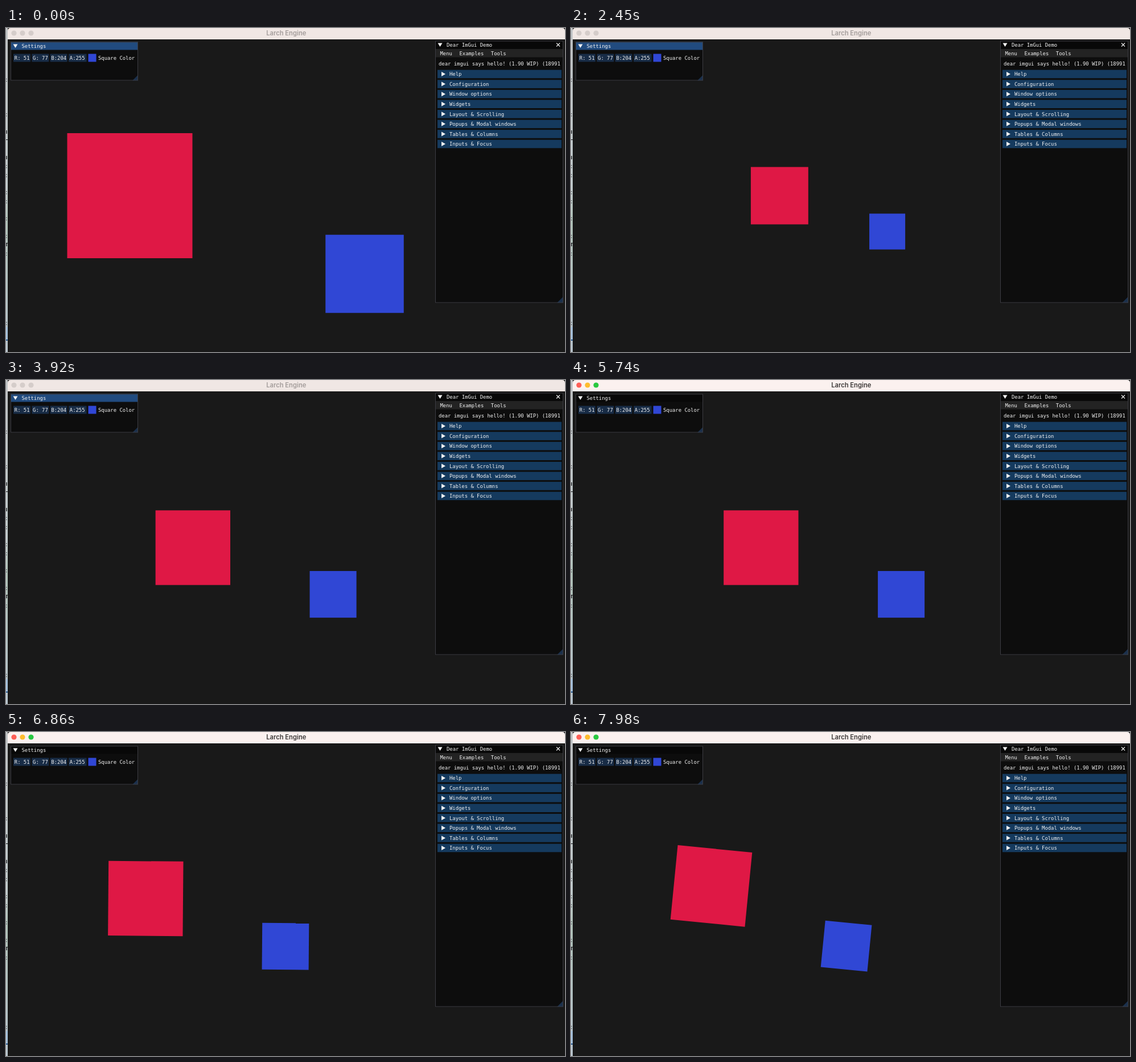
An HTML page that plays this animation: 982 by 570 pixels, repeating every 8 s.

```html
<!DOCTYPE html>
<html lang="en">
<head>
<meta charset="utf-8">
<title>Larch Engine</title>
<style>
  html, body { margin: 0; width: 100%; height: 100%; overflow: hidden; background: #191919; }
  svg { display: block; width: 100vw; height: 100vh; }
  .ui { font: 8.9px "DejaVu Sans Mono", monospace; fill: #f4f4f4; white-space: pre; }
  .title { font: 600 11.2px Inter, sans-serif; text-anchor: middle; }
</style>
</head>
<body>
<svg id="stage" viewBox="0 0 982 570">
  <defs>
    <clipPath id="view"><rect x="3" y="20" width="979" height="550"/></clipPath>
    <linearGradient id="edge" x2="0" y2="1">
      <stop offset="0" stop-color="#c3c6c8"/>
      <stop offset=".5" stop-color="#c6d0d2"/>
      <stop offset=".6" stop-color="#b4c6bd"/>
      <stop offset="1" stop-color="#bcc8d2"/>
    </linearGradient>
  </defs>
  <rect width="982" height="570" fill="#191919"/>
  <g id="behind"><rect width="3" height="570" fill="url(#edge)"/></g>
  <g clip-path="url(#view)">
    <g id="scene">
      <rect x="-1.4" y="-.4" width=".8" height=".8" fill="#df1845"/>
      <rect x=".25" y=".25" width=".5" height=".5" fill="#3047d5"/>
    </g>
  </g>
  <path id="bar" d="M3 20V5Q3 0 8 0H977Q982 0 982 5V20Z"/>
  <g id="lights"></g>
  <text id="title" class="title" x="492.3" y="13">Larch Engine</text>
  <g id="settings"></g>
  <g id="demo"></g>
</svg>
<script>
const NS = "http://www.w3.org/2000/svg";
const $ = id => document.getElementById(id);

function add(parent, tag, attrs, text) {
  const el = document.createElementNS(NS, tag);
  for (const k in attrs) el.setAttribute(k, attrs[k]);
  if (text) el.textContent = text;
  return parent.appendChild(el);
}
const box = (p, x, y, width, height, fill) => add(p, "rect", { x, y, width, height, fill });
const label = (p, x, y, text) => add(p, "text", { x, y, class: "ui" }, text);
const shape = (p, d, fill = "#f4f4f4") => add(p, "path", { d, fill });

function panel(p, x, y, w, h, barColor, grip) {
  box(p, x, y, w, h, "#0d0d0d");
  const bar = box(p, x, y, w, 14, barColor);
  shape(p, `M${x + w} ${y + h}v${-grip}l${-grip} ${grip}z`, "#1b304c");
  add(p, "rect", { x: x + .5, y: y + .5, width: w - 1, height: h - 1, fill: "none", stroke: "#3c3c42" });
  shape(p, `M${x + 4.5} ${y + 4}h8l-4 6.5z`);
  return bar;
}

// Sliver of the window behind
for (const y of [91, 152, 243, 259, 289, 305, 335, 366, 397, 519]) {
  box($("behind"), 0, y - 2, 1.4, 1.4, "#55595c");
  box($("behind"), 0, y + 2, 1.4, 1.4, "#55595c");
}
for (const y of [183, 228, 381]) box($("behind"), 0, y - 3, 2, 6, "#54585a");
for (const y of [196, 378]) box($("behind"), 0, y, 3, 1, "#17191b");
box($("behind"), 0, 526, 3, 22, "#a9c4df");
box($("behind"), 0, 548, 3, 2, "#26588f");

const lights = [14, 29, 44].map(cx => add($("lights"), "circle", { cx, cy: 9, r: 4.6 }));

const settings = $("settings");
const settingsBar = panel(settings, 8, 24.5, 224, 68, "#214b7f", 10);
label(settings, 27.5, 35.3, "Settings");
[["R: 51", 13], ["G: 77", 45.3], ["B:204", 77.6], ["A:255", 110]].forEach(([text, x], i) => {
  box(settings, x, 45.5, i < 3 ? 30 : 31.5, 14, "#182c46");
  label(settings, x + 1.8, 55.7, text);
});
box(settings, 144.5, 45.5, 14, 14, "#3047d5");
label(settings, 162, 55.7, "Square Color");

const demo = $("demo");
panel(demo, 754, 22.5, 225, 461, "#080808", 11);
label(demo, 774, 33.2, "Dear ImGui Demo");
add(demo, "path", { d: "M967 26.5l6 6m0-6l-6 6", stroke: "#f4f4f4", "stroke-width": 1.1 });
box(demo, 755, 37, 223, 14.5, "#232323");
[["Menu", 762.5], ["Examples", 796.5], ["Tools", 851.8]].forEach(([text, x]) => label(demo, x, 47.6, text));
label(demo, 760, 66, "dear imgui says hello! (1.90 WIP) (18991");
["Help", "Configuration", "Window options", "Widgets", "Layout & Scrolling",
 "Popups & Modal windows", "Tables & Columns", "Inputs & Focus"].forEach((text, i) => {
  const y = 81 + 17.57 * i;
  box(demo, 758, y - 7.3, 218, 14.6, "#153a5e");
  shape(demo, `M765 ${y - 4}v8l7-4z`);
  label(demo, 779, y + 3.3, text);
});

// Piecewise linear value of [time, value] points
function track(points, t) {
  if (t <= points[0][0]) return points[0][1];
  for (let i = 1; i < points.length; i++) {
    const [t0, a] = points[i - 1], [t1, b] = points[i];
    if (t <= t1) return a + (b - a) * (t - t0) / (t1 - t0);
  }
  return points[points.length - 1][1];
}

const LOOP = 8000, STEP = 70, FOCUS = 5390;
const zoom = [[2100, 1], [2450, 2.18], [2590, 2.45], [2660, 2.4], [2940, 1.15], [3150, .65],
              [3290, .5], [3500, 1.14], [3570, 1.14], [3780, 1.54], [3920, 1.675]];
const pan = [[5720, 0], [6058, 93], [6132, 93], [6772, -83]];
const turn = [[6857.4, 0], [7290, 78], [7578, 78], [7980, 5.6]];

function draw(time) {
  const t = Math.floor(time % LOOP / STEP) * STEP;
  const focused = t >= FOCUS;
  $("scene").setAttribute("transform",
    `translate(492.5 295) rotate(${track(turn, t)}) translate(${track(pan, t)} 0) scale(${275 / track(zoom, t)})`);
  $("bar").setAttribute("fill", focused ? "#fbf1ef" : "#f0e7e4");
  $("title").setAttribute("fill", focused ? "#3b3837" : "#a39c9a");
  settingsBar.setAttribute("fill", focused ? "#080808" : "#214b7f");
  lights.forEach((c, i) => c.setAttribute("fill", focused ? ["#fe5f57", "#febc2e", "#28c840"][i] : "#d5cdca"));
}

const start = performance.now();
function tick() {
  draw(performance.now() - start);
  requestAnimationFrame(tick);
}
tick();
</script>
</body>
</html>
```
